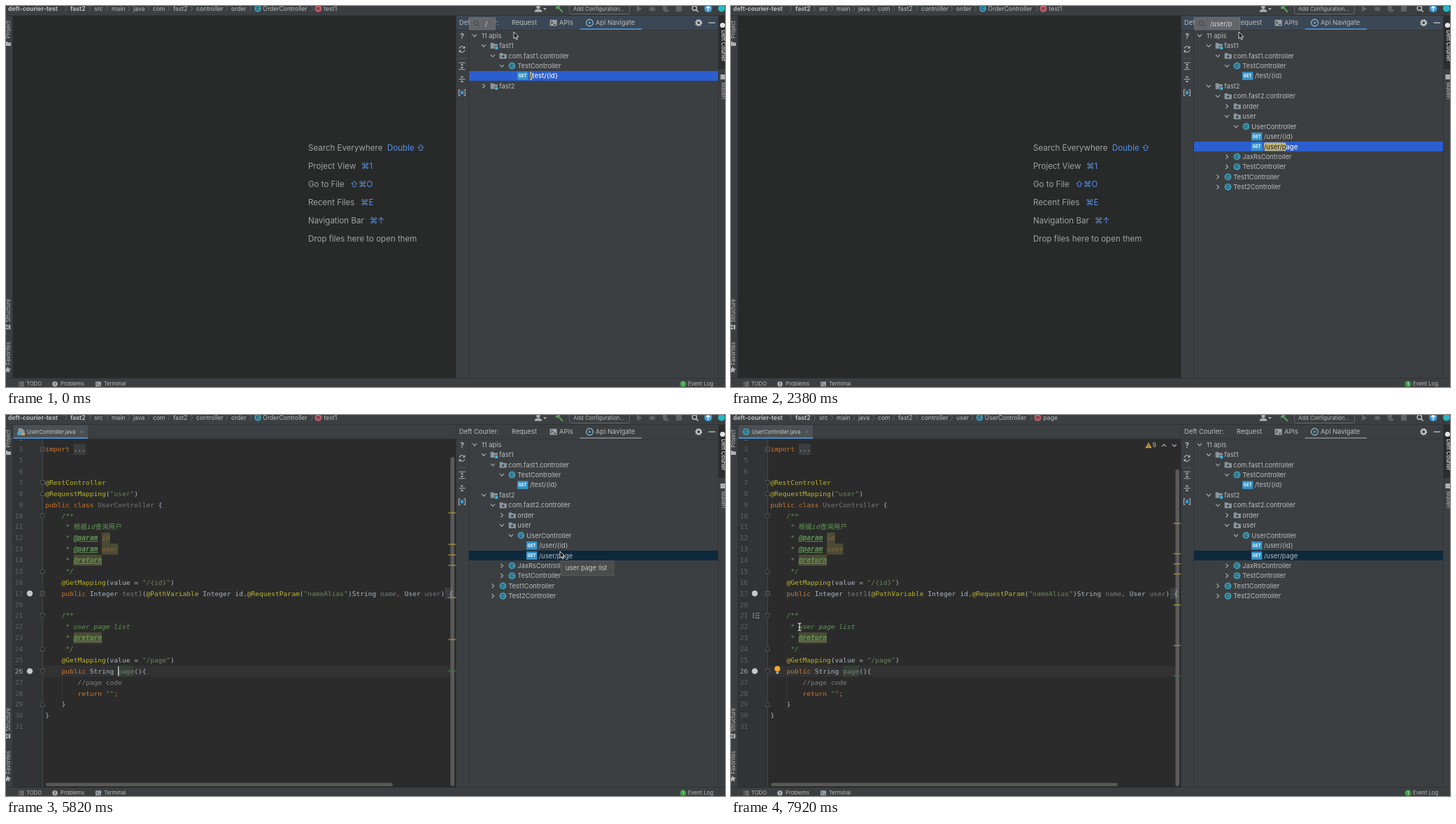
Animation, 1028 px wide and 545 px high, one loop 8 s. Source, as an HTML page:

```html
<!DOCTYPE html>
<html lang="en">
<head>
<meta charset="utf-8">
<title>Api navigation</title>
<style>
html, body { margin: 0; width: 100%; height: 100%; overflow: hidden; background: #3c3f41; }
svg { display: block; }
text { font-family: Inter, "Noto Sans", sans-serif; white-space: pre; }
.code { font-family: "DejaVu Sans Mono", "Noto Sans CJK SC", "Noto Sans CJK", monospace; font-size: 9.585px; }
.k { fill: #cc7832; } .a { fill: #bbb529; } .s { fill: #6a8759; } .t, .f { fill: #a9b7c6; }
.u, .h { fill: #787a7c; } .c { fill: #808080; } .d { fill: #629755; font-style: italic; }
.z { fill: #629755; }
.r, .g { fill: #629755; font-style: italic; font-weight: bold; text-decoration: underline; }
.p { fill: #8a653b; font-style: italic; }
</style>
</head>
<body>
<svg id="stage" width="1028" height="545" viewBox="0 0 1028 545">
  <defs>
    <clipPath id="codeClip"><rect x="10" y="34.5" width="633" height="498"/></clipPath>
  </defs>
  <g id="frame"></g><g id="crumbs"></g><g id="editor"></g><g id="header"></g>
  <g id="tree"></g><g id="popup"></g><g id="tip"></g><g id="mouse"></g>
</svg>
<script>
const LOOP = 8000, UI = 9.35, SMALL = 7.7;
const GREY = '#afb1b3', INK = '#bbbdbe', PANEL = '#3c3f41', EDGE = '#313335';

const esc = s => s.replace(/&/g, '&amp;').replace(/</g, '&lt;');
const rect = (x, y, w, h, fill, more = '') => `<rect x="${x}" y="${y}" width="${w}" height="${h}" fill="${fill}" ${more}/>`;
const circle = (x, y, r, fill, more = '') => `<circle cx="${x}" cy="${y}" r="${r}" fill="${fill}" ${more}/>`;
const line = (d, color = GREY, w = 1, more = '') => `<path d="${d}" fill="none" stroke="${color}" stroke-width="${w}" ${more}/>`;
const shape = (d, fill = GREY, more = '') => `<path d="${d}" fill="${fill}" ${more}/>`;
// y is the middle of the capitals
const text = (x, y, s, size = UI, fill = INK, more = '') =>
  `<text x="${x}" y="${y + size * .36}" font-size="${size}" fill="${fill}" ${more}>${esc(s)}</text>`;
const turned = (x, y, angle, s, fill = INK, more = '') =>
  `<g transform="translate(${x} ${y}) rotate(${angle})">${text(0, 0, s, SMALL, fill, more)}</g>`;

const pen = document.createElement('canvas').getContext('2d');
function widthOf(s) {
  pen.font = UI + 'px Inter, "Noto Sans", sans-serif';
  return pen.measureText(s).width;
}

const shown = {};
function put(id, html) {
  if (shown[id] === html) return;
  shown[id] = html;
  document.getElementById(id).innerHTML = html;
}

// icons
const chevron = (x, y, open) => open
  ? line(`M${x - 3} ${y - 1.6}l3 3.2 3-3.2`, GREY, 1.1)
  : line(`M${x - 1.6} ${y - 3}l3.2 3-3.2 3`, GREY, 1.1);
const badge = (x, y, letter, color, ink = '#24333a') => circle(x, y, 5, color) +
  text(x, y, letter, 6.8, ink, 'text-anchor="middle" font-weight="500"');
const classIcon = (x, y) => badge(x, y, 'C', '#3c93ad');
const folder = (x, y) => shape(`M${x - 5} ${y - 4}h4l1.4 1.6h4.8v6.6h-10.2z`, '#89959d');
const glass = (x, y, r, color) => circle(x, y, r, 'none', `stroke="${color}" stroke-width="1.4"`) +
  line(`M${x + r * .7} ${y + r * .7}l${r} ${r}`, color, 1.5);
const prompt = (x, y, s = 1) => `<g transform="translate(${x} ${y}) scale(${s})">` +
  rect(-5, -4.2, 10, 8.6, '#9aa1a6') + line('M-3.4-2.2l2.2 2-2.2 2M.4 2.4h3', '#333', 1.1) + '</g>';

function frame() {
  const hints = [['Search Everywhere', 'Double ⇧', 545], ['Project View', '⌘1', 508], ['Go to File', '⇧⌘O', 492],
    ['Recent Files', '⌘E', 507], ['Navigation Bar', '⌘↑', 520], ['Drop files here to open them', '', 0]];
  let s = rect(0, 0, 1028, 545, PANEL) + rect(10, 14, 633, 519, '#282a29');
  hints.forEach(([name, key, x], i) => {
    const y = 202.5 + 26 * i;
    s += text(432, y, name, 11.55, '#a2a4a4') + text(x, y, key, 11.55, '#5590ec');
  });
  // side strips
  s += rect(9, 14, 1, 519, EDGE) + rect(0, 13, 1028, 1, EDGE) + rect(643, 14, 1, 519, EDGE) +
    rect(1018, 14, 1, 519, EDGE) + rect(0, 532, 1028, 1, EDGE) + rect(1019, 14, 9, 76, '#2b2d2e');
  s += turned(3, 46.5, -90, 'Project') + turned(3, 452.5, -90, 'Structure') + turned(3, 513.5, -90, 'Favorites');
  s += shape('M-1 51h3l1 1.3h4v4.7h-8z') + rect(0, 456, 2.6, 2.6, GREY) + rect(0, 460, 2.6, 2.6, GREY) +
    rect(3.6, 456, 2.6, 6.6, GREY) + shape('M2.5 515.5l1.4 3.1 3.4.3-2.6 2.3.8 3.3-3-1.8-3 1.8.8-3.3-2.6-2.3 3.4-.3z');
  s += circle(1024.5, 27.5, 3.6, '#e3e5e6') + turned(1025.3, 34.5, 90, 'Deft Courier', '#e6e6e6', 'font-weight="500"') +
    rect(1021.5, 98, 7, 7, GREY) + turned(1025.3, 109, 90, 'Maven');
  // status bar
  s += line('M18 538.2h1.4M18 540.7h1.4M18 543.2h1.4M20.5 538.2h5M20.5 540.7h5M20.5 543.2h5') +
    text(29, 540.7, 'TODO', SMALL) + circle(70, 540.7, 3.7, GREY) + rect(69.5, 538.3, 1.1, 3, PANEL) +
    rect(69.5, 542, 1.1, 1.1, PANEL) + text(78, 540.7, 'Problems', SMALL) + prompt(132, 540.7, .8) +
    text(140, 540.7, 'Terminal', SMALL) + circle(968, 540.8, 4.6, '#3f9a4b') +
    text(968, 540.9, '1', 6.5, '#fff', 'text-anchor="middle"') + text(975, 540.7, 'Event Log', SMALL);
  // run toolbar
  s += circle(761, 1.5, 2.6, GREY) + shape('M755.5 8.5q.5-4 5.5-4t5.5 4z') + shape('M768 3h5l-2.5 3z') +
    line('M789.5 2l6.5 6.8', '#5aa05f', 2) + line('M786.5 3.5l5-4', '#5aa05f', 3) +
    rect(805.5, -8, 86, 19.5, 'none', 'rx="3" stroke="#65696b"') + text(811, 3.8, 'Add Configuration...', SMALL) +
    shape('M902 -.5l7.5 4.5-7.5 4.5z', '#606466') + circle(924, 4.3, 3, '#606466') +
    line('M919.5 1l9 6.5M919.5 7.5l9-6.5M919 4.3h10', '#606466') +
    shape('M939 0h6v4h-2v4.5q-4-1.5-4-5z', '#606466') + shape('M943.5 3.5l5 3-5 3z', '#606466') +
    rect(958, 0, 8, 8, '#606466') + glass(984.3, 3, 3.2, '#c4c6c7') +
    circle(1004, 3.5, 5.6, '#3c9bd6') + line('M1004 7V.8M1001.2 3.3l2.8-2.7 2.8 2.7', '#fff', 1.3) +
    circle(1023, 3.5, 5, '#25b7c4');
  // tool window buttons
  s += rect(661, 34, 1, 498, EDGE) + text(652, 43.5, '?', 10.5, '#c4c6c7', 'text-anchor="middle" font-weight="600"') +
    line('M648.2 61a4 4 0 0 1 7-1.8M655.8 63a4 4 0 0 1-7 1.8', GREY, 1.2) +
    shape('M656.4 57v3.8h-3.8z') + shape('M647.6 67v-3.8h3.8z') + rect(646, 74.5, 12, 1, '#55585a') +
    line('M647.5 81.3h9M647.5 90.7h9', GREY, 1.1) + shape('M652 82.5l2.3 2.4h-4.6zM652 89.5l2.3-2.4h-4.6z') +
    line('M647.5 104.8h9', GREY, 1.1) + shape('M652 103.3l2.3-2.6h-4.6zM652 106.3l2.3 2.6h-4.6z') +
    line('M649.5 119.7h-2v8.4h2M654.5 119.7h2v8.4h-2', GREY, 1.1) + rect(649.8, 121.5, 4.4, 4.8, '#3d9bd0');
  return s;
}

function crumbs(atPage) {
  const y = 3.7, size = 8.65;
  const path = [[92, 'fast2'], [126, 'src'], [151, 'main'], [182, 'java'], [210, 'com'], [239, 'fast2'], [272, 'controller']];
  path.push([322, atPage ? 'user' : 'order']);
  let s = text(3, y, 'deft-courier-test', size, INK, 'font-weight="700"');
  const mark = x => line(`M${x - 1.2} ${y - 4}l2.4 4-2.4 4`, '#686c6e', .9);
  path.forEach(([x, name], i) => {
    s += mark(x - 6.5) + text(x, y, name, size, INK, i ? '' : 'font-weight="700"');
  });
  const [cx, mx] = atPage ? [355.5, 438.5] : [360, 446.5];
  return s + mark(cx - 10.5) + classIcon(cx, y) + text(cx + 7.3, y, atPage ? 'UserController' : 'OrderController', size) +
    mark(mx - 9) + badge(mx, y, 'm', '#c4606c', '#3b2a2d') + text(mx + 8, y, atPage ? 'page' : 'test1', size);
}

// each line: number, indent, tokens led by their class letter
const code = [
  [3, 0, 'kimport |f...'], [5], [6],
  [7, 0, 'a@RestController'],
  [8, 0, 'a@RequestMapping|t(|s"user"|t)'],
  [9, 0, 'kpublic class |uUserController |t{'],
  [10, 4, 'd/**'],
  [11, 5, 'd* |z根据|did|z查询用户'],
  [12, 5, 'd* |g@param|d |pid'],
  [13, 5, 'd* |g@param|d |puser'],
  [14, 5, 'd* |r@return'],
  [15, 5, 'd*/'],
  [16, 4, 'a@GetMapping|t(value = |s"/{id}"|t)'],
  [17, 4, 'kpublic |tInteger |utest1|t(|a@PathVariable |tInteger id|k,|a@RequestParam|t(|s"nameAlias"|t)String |uname|k, |tUser |uuser|t)|f {'],
  [20],
  [21, 4, 'd/**'],
  [22, 5, 'd* user page list'],
  [23, 5, 'd* |r@return'],
  [24, 5, 'd*/'],
  [25, 4, 'a@GetMapping|t(value = |s"/page"|t)'],
  [26, 4, 'kpublic |tString |hpage|t(){'],
  [27, 8, 'c//page code'],
  [28, 8, 'kreturn |s""|k;'],
  [29, 4, 't}'], [30, 0, 't}'], [31]
];
const ADV = 5.77, CODE_X = 56.3;
const lineY = n => 49 + 15.87 * code.findIndex(l => l[0] === n);
const tokenBack = { r: '#4b4b35', p: '#4b4b35', f: '#3b3d3e', h: '#364036' };

function codeLine([n, indent = 0, src]) {
  const y = lineY(n), base = y + 3.4;
  let s = `<text class="code" x="24.3" y="${base}" text-anchor="end" fill="${n === 26 ? '#a8aaab' : '#606366'}">${n}</text>`;
  if (!src) return s;
  let col = indent, back = '', spans = '';
  for (const token of src.split('|')) {
    const kind = token[0], word = token.slice(1);
    if (tokenBack[kind]) back += rect(CODE_X + col * ADV, y - 7.9, word.length * ADV, 15.8, tokenBack[kind]);
    spans += `<tspan class="${kind}">${esc(word)}</tspan>`;
    col += word.length;
  }
  return s + back + `<text class="code" x="${CODE_X + indent * ADV}" y="${base}">${spans}</text>`;
}

const docIcon = y => line(`M32 ${y - 4}v8`, '#8a8d8f', 1.2) +
  line(`M34.5 ${y - 3.3}h6.5M34.5 ${y}h6.5M34.5 ${y + 3.3}h6.5`, '#8a8d8f', 1.1);

function editor(t) {
  if (t < 5820) return '';
  const checked = t >= 6850, tabReady = t >= 5960;
  let s = rect(10, 14, 633, 519, '#2b2b2b') + rect(10, 34, 42, 498, '#313335');
  s += '<g clip-path="url(#codeClip)">' + rect(52, lineY(26) - 7.9, 584, 15.8, '#323232') +
    rect(52, 34, .8, 498, '#4c4f51') + rect(79.5, 374, .8, 33, '#393b3c') +
    '<text class="code" x="24.3" y="36.5" text-anchor="end" fill="#606366">2</text>' + code.map(codeLine).join('');
  for (const n of [3, 7, 8, 10, 15, 17, 21, 24, 26, 29]) {
    const y = lineY(n), end = [8, 15, 24, 29].includes(n);
    s += n === 3 || n === 17
      ? rect(49.2, y - 3, 6, 6, '#2b2b2b', 'stroke="#66696b" stroke-width=".8"') + line(`M50.5 ${y}h3.4`, '#777a7c', .8)
      : shape(end ? `M49.2 ${y + 3}h6v-4l-3-2.6-3 2.6z` : `M49.2 ${y - 3}h6v4l-3 2.6-3-2.6z`, '#2b2b2b', 'stroke="#606365" stroke-width=".8"');
  }
  s += circle(34, lineY(17), 4.2, '#c3c7c9') + circle(34, lineY(26), 4.2, '#c3c7c9');
  if (t >= 6700 && t < 7050) s += docIcon(lineY(10));
  if (t >= 7350) s += docIcon(lineY(21));
  if (t >= 7500) s += circle(66.3, 363, 4, '#f0a732') + rect(64.6, 367.5, 3.4, 2.6, '#b9bbbc');
  if (t < 7920) s += rect(160, lineY(26) - 7, 1.3, 14, '#d0d2d3');
  s += '</g>';
  // tab
  s += rect(10, 14, 633, 20, PANEL) + rect(10, 33.5, 633, 1, EDGE) + rect(10.5, 14.5, 106.5, 19, '#4b5054') +
    rect(10.5, 32, 106.5, 2, '#4a88c7');
  s += tabReady ? classIcon(21.5, 24) : shape('M17.5 19h5l4 3.5v6.5h-9z', '#8f9aa2') + rect(16, 24.5, 6, 4, '#4aa3cc') + rect(23, 25.5, 4, 3.5, '#d5a254');
  s += text(30, 24, 'UserController.java', SMALL, '#c5cacc') + line('M106 21.8l4.4 4.4M110.4 21.8l-4.4 4.4', '#777b7d', .9);
  // scroll bars and stripe
  const top = checked ? 78 : 60;
  s += rect(635.5, top, 5.5, 531 - top, '#a6a6a6', 'rx="2.7" fill-opacity=".39"') +
    rect(57, 526.3, 496, 4.8, '#a6a6a6', 'rx="2.4" fill-opacity=".37"');
  [140, 185, 200, 215, 261, 321, 366].forEach((y, i) => {
    const at = checked ? 155 + (y - 140) * .9646 : y;
    s += rect(632.5, at - .6, 10.5, 1.3, i === 6 ? '#3b7a45' : i === 5 ? '#b5832f' : '#ab9335');
  });
  if (checked) {
    s += shape('M597 39l4.6 8.3h-9.2z', '#cf9f35') + rect(596.5, 41.7, 1, 2.7, '#333') + rect(596.5, 45.2, 1, 1, '#333') +
      text(602.8, 43.5, '9', 8.3) + line('M616 45l3-3 3 3M631 42l3 3 3-3', GREY, 1.1);
  }
  return s;
}

function header(focused) {
  const y = 24;
  return rect(644, 14, 374, 20, focused ? '#3b4754' : PANEL) + rect(644, 34, 374, .7, EDGE) +
    text(648, y, 'Deft Courier:') + text(723, y, 'Request') + prompt(782.7, y) + text(791, y, 'APIs') +
    circle(834.5, y, 4.9, 'none', 'stroke="#9fc3da" stroke-width="1.1"') + circle(834.5, y, 1.7, '#4aa0d0') +
    text(843, y, 'Api Navigate') + rect(820.5, 32, 88.5, 2, focused ? '#4a88c7' : '#747a80') +
    circle(990.3, y, 3, 'none', 'stroke="#c4c6c7" stroke-width="2"') +
    circle(990.3, y, 4.5, 'none', 'stroke="#c4c6c7" stroke-width="1.3" stroke-dasharray="1.8 1.73"') +
    rect(1004.5, 23.4, 9.5, 1.3, '#c4c6c7');
}

// depth, kind, label, open
const fullTree = [
  [0, '', '11 apis', 1], [1, 'mod', 'fast1', 1], [2, 'pkg', 'com.fast1.controller', 1],
  [3, 'cls', 'TestController', 1], [4, 'get', '/test/{id}'], [1, 'mod', 'fast2', 1],
  [2, 'pkg', 'com.fast2.controller', 1], [3, 'pkg', 'order', 0], [3, 'pkg', 'user', 1],
  [4, 'cls', 'UserController', 1], [5, 'get', '/user/{id}'], [5, 'get', '/user/page'],
  [3, 'cls', 'JaxRsController', 0], [3, 'cls', 'TestController', 0],
  [2, 'cls', 'Test1Controller', 0], [2, 'cls', 'Test2Controller', 0]
];
const shortTree = [...fullTree.slice(0, 5), [1, 'mod', 'fast2', 0]];

function treeRow([depth, kind, label, open], y, typed, selected) {
  const x = 670 + 13 * depth, tx = kind === 'get' ? x + 27 : kind ? x + 22.3 : 680;
  let s = kind === 'get' ? '' : chevron(x, y, open);
  if (kind === 'cls') s += classIcon(x + 14.5, y);
  if (kind === 'mod' || kind === 'pkg') s += folder(x + 14.7, y);
  if (kind === 'mod') s += rect(x + 15.5, y + .5, 5, 5, PANEL) + rect(x + 16.3, y + 1.3, 4, 4, '#40b6e0');
  if (kind === 'pkg') s += circle(x + 14.8, y + .9, 1.7, PANEL);
  if (kind === 'get') s += rect(x + 9, y - 5.8, 15.4, 11.6, '#3694c9') +
    text(x + 16.7, y, 'GET', 5.8, '#fff', 'text-anchor="middle" font-weight="700"');
  const ink = selected && typed ? '#f2f4f6' : INK;
  if (kind !== 'get' || !typed || !label.startsWith(typed)) return s + text(tx, y, label, UI, ink);
  const w = widthOf(typed);
  return s + rect(tx, y - 5.8, w, 11.8, selected ? '#c2b573' : '#bd9f42', 'rx="2"') + text(tx, y, typed, UI, '#202122') +
    text(tx + w, y, label.slice(typed.length), UI, ink, selected ? 'font-weight="500"' : '');
}

function tree(t, typed) {
  const rows = t < 140 ? shortTree : fullTree, picked = t < 140 ? 4 : t < 2380 ? 10 : 11;
  const rowY = i => 42.3 + 14.44 * i;
  return rect(662, Math.round(rowY(picked) - 7.5), 356, 14, typed ? '#2b5ecf' : '#0d293e') +
    rows.map((row, i) => treeRow(row, rowY(i), typed, i === picked)).join('');
}

// last entry whose start time has passed
const latest = (list, t) => list.filter(e => e[0] <= t).pop();

const typing = [[0, 1], [140, 2], [590, 3], [890, 4], [1190, 5], [1630, 6], [2380, 7], [2530, 8], [2830, 10]];
const typedAt = t => t < 5820 ? '/user/page'.slice(0, latest(typing, t)[1]) : '';

const popup = typed => typed && rect(662.5, 16.5, widthOf(typed) + 33.5, 17.5, '#636668', 'stroke="#74777a" stroke-width=".8"') +
  glass(672, 24.5, 3, '#4f5356') + text(685, 25.5, typed, UI, '#d4d6d7');

const tooltip = () => rect(793.5, 208.8, 75.5, 20.7, '#4b4d4d', 'stroke="#5b5e5f" stroke-width=".8"') +
  text(800, 219, 'user page list', UI, '#c6c8c9');

const moves = [
  [0, 726, 37], [3280, 728, 47], [3430, 741, 92], [3570, 766, 150], [3720, 786, 187], [3870, 792, 195],
  [6110, 690, 205], [6260, 420, 225], [6400, 214, 241], [6550, 180, 234], [6700, 150, 224], [6850, 132, 218],
  [7050, 116, 245], [7200, 104, 276], [7350, 99, 297], [7500, 98, 303]
];
function mouse(t) {
  const [, x, y] = latest(moves, t);
  const beam = line('M-2.5-5.2q2.5 0 2.5 1.5V4q0 1.5-2.5 1.5M2.5-5.2Q0-5.2 0-3.7V4q0 1.5 2.5 1.5M-1.5.8h3', '#e4e6e7', 1.1);
  const arrow = shape('M0 0v9.6l2.2-2 1.5 3.4 1.6-.7-1.5-3.3h3z', '#111', 'stroke="#eee" stroke-width=".9"');
  return `<g transform="translate(${x} ${y})">${x < 643 ? beam : arrow}</g>`;
}

function draw(t) {
  const typed = typedAt(t);
  put('crumbs', crumbs(t >= 5960));
  put('editor', editor(t));
  put('header', header(t < 5820));
  put('tree', tree(t, typed));
  put('popup', popup(typed));
  put('tip', t >= 4470 && t < 6110 ? tooltip() : '');
  put('mouse', mouse(t));
}

put('frame', frame());
const start = performance.now();
function tick() {
  draw((performance.now() - start) % LOOP);
  requestAnimationFrame(tick);
}
tick();
</script>
</body>
</html>
```
